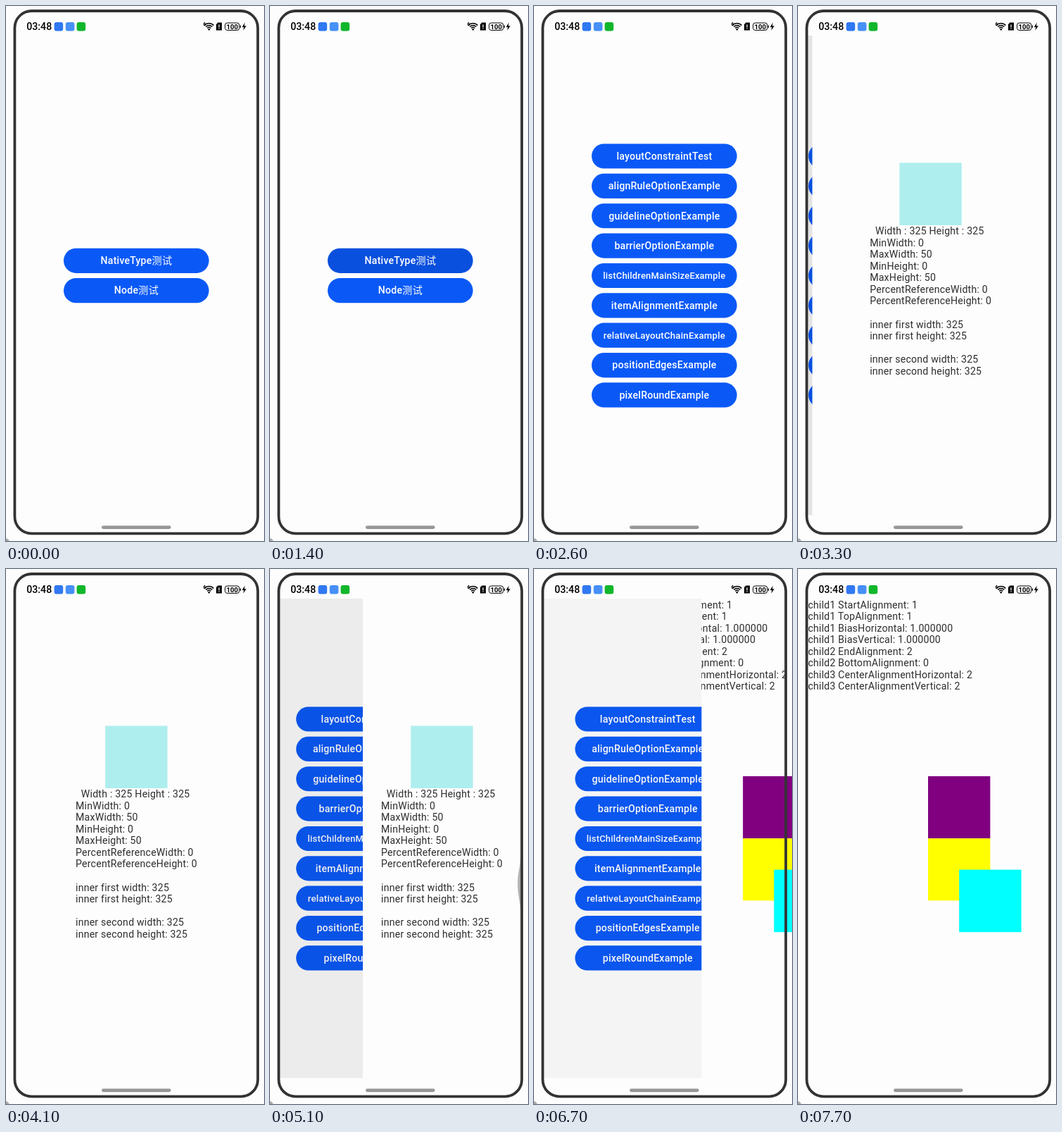
Animation, 367 px wide and 759 px high, one loop 8000 ms. Source, as an HTML page:

```html
<!DOCTYPE html>
<html lang="en">
<head>
<meta charset="utf-8">
<title>Phone navigation</title>
<style>
html, body { margin: 0; width: 100%; height: 100%; overflow: hidden; background: #fdfdfd; }
svg { display: block; width: 100%; height: 100%; }
text { font-family: Roboto, "Noto Sans CJK SC", "Noto Sans CJK", sans-serif; font-size: 14.15px; letter-spacing: .2px; white-space: pre; }
.label { fill: #fff; font-weight: 500; text-anchor: middle; }
.body { fill: #2e2e2e; }
</style>
</head>
<body>
<svg id="stage" viewBox="0 0 367 759"></svg>
<script>
const LOOP = 8000, STEP = 100, SLIDE = 600;
const LEFT = 14, TOP = 42, WIDTH = 342.4, HEIGHT = 680.5;
const BLUE = '#0a59f7', PRESSED = '#0950de', PAPER = '#fdfdfd';

const rect = (x, y, w, h, fill, rx = 0) =>
  `<rect x="${x}" y="${y}" width="${w}" height="${h}" rx="${rx}" fill="${fill}"/>`;

const buttons = (labels, top, sizes = {}) => labels.map((label, i) => {
  const y = top + i * 42.37;
  return rect(82, y, 206.7, 35.2, BLUE, 17.6) +
    `<text class="label" x="185.4" y="${y + 22.4}" style="font-size:${sizes[i] || 14.15}px">${label}</text>`;
}).join('');

const lines = (rows, x, y) => rows.map((row, i) =>
  `<text class="body" x="${x}" y="${y + i * 16.57}">${row}</text>`).join('');

const home = buttons(['NativeType测试', 'Node测试'], 343.7);

const list = buttons([
  'layoutConstraintTest', 'alignRuleOptionExample', 'guidelineOptionExample',
  'barrierOptionExample', 'listChildrenMainSizeExample', 'itemAlignmentExample',
  'relativeLayoutChainExample', 'positionEdgesExample', 'pixelRoundExample'
], 195.4, { 4: 12.95, 6: 13.26 });

const layout = rect(141.2, 222.5, 88.4, 88.5, '#afeeee') +
  lines(['Width : 325 Height : 325'], 106.8, 324) +
  lines([
    'MinWidth: 0', 'MaxWidth: 50', 'MinHeight: 0', 'MaxHeight: 50',
    'PercentReferenceWidth: 0', 'PercentReferenceHeight: 0', '',
    'inner first width: 325', 'inner first height: 325', '',
    'inner second width: 325', 'inner second height: 325'
  ], 99, 340.6);

const align = lines([
  'child1 StartAlignment: 1', 'child1 TopAlignment: 1',
  'child1 BiasHorizontal: 1.000000', 'child1 BiasVertical: 1.000000',
  'child2 EndAlignment: 2', 'child2 BottomAlignment: 0',
  'child3 CenterAlignmentHorizontal: 2', 'child3 CenterAlignmentVertical: 2'
], 14.2, 55.5) +
  rect(185, 294, 88.4, 88.4, '#800080') +
  rect(185, 382.2, 88.4, 88.2, '#ffff00') +
  rect(229.2, 426.6, 88.5, 88.6, '#00ffff');

const page = (content, i) => `
  <clipPath id="clip${i}"><rect x="${LEFT}" y="${TOP}" width="${WIDTH}" height="${HEIGHT}"/></clipPath>
  <g class="page" clip-path="url(#clip${i})">
    ${rect(LEFT, TOP, WIDTH, HEIGHT, PAPER)}
    <g class="content">${content}</g>
    <rect class="dim" x="${LEFT}" y="${TOP}" width="${WIDTH}" height="${HEIGHT}"/>
  </g>`;

const arc = r => {
  const d = r * .72;
  return `<path d="M${288.8 - d} ${34 - d}A${r} ${r} 0 0 1 ${288.8 + d} ${34 - d}" fill="none" stroke="#000" stroke-width="1.5"/>`;
};

const statusBar = `
  <text x="29.3" y="34" style="font-weight:500;letter-spacing:0">03:48</text>
  ${rect(68.6, 23, 12.6, 12.4, '#2f78f2', 3)}
  ${rect(84.8, 23, 12.6, 12.4, '#4690f8', 3)}
  ${rect(100.6, 23, 12.6, 12.4, '#10b62c', 3)}
  ${arc(3.6)}${arc(6.4)}${arc(9.2)}<circle cx="288.8" cy="33.2" r="1.3"/>
  <text x="280.6" y="28.4" style="font-size:6.5px;font-weight:700">6</text>
  <path d="M301.5 23.5H307V34.5H299V26Z"/>
  ${rect(302.4, 26.3, 1.3, 4, '#fff')}${rect(302.4, 31.3, 1.3, 1.3, '#fff')}
  <rect x="311.6" y="24" width="20.2" height="10.4" rx="3" fill="none" stroke="#000"/>
  ${rect(332.8, 27.2, 1.2, 4, '#000', .6)}
  <text x="321.8" y="32.7" text-anchor="middle" style="font-size:9.6px;font-weight:700;letter-spacing:.1px">100</text>
  <path d="M339.8 23.6L335.8 30H338.4L337.4 34.8L341.8 28.2H339Z"/>`;

const stage = document.getElementById('stage');
stage.innerHTML = rect(0, 0, 367, 759, PAPER) +
  [home, list, layout, align].map(page).join('') + statusBar + `
  <path id="bulge" fill="#666" opacity=".5"/>
  <path id="chevron" fill="none" stroke="#fff" stroke-width="1.6"/>
  ${rect(136, 737.3, 98.6, 4.6, '#979797', 2.3)}
  <rect x="12.4" y="7" width="345.8" height="741.4" rx="24" fill="none" stroke="#333" stroke-width="3.8"/>
  <path d="M0 755Q4 756 4.5 759H0Z" fill="#aaa"/>`;

const pages = [...stage.querySelectorAll('.page')].map((node, i) => ({
  node,
  mask: stage.querySelector(`#clip${i} rect`),
  content: node.querySelector('.content'),
  dim: node.querySelector('.dim'),
  keys: node.querySelectorAll('.content rect')
}));
const bulge = document.getElementById('bulge');
const chevron = document.getElementById('chevron');

const moves = [
  { at: 1461, under: 0, top: 1 },
  { at: 2980, under: 1, top: 2 },
  { at: 5034, under: 1, top: 2, back: true },
  { at: 6634, under: 1, top: 3 }
];
const presses = [
  { from: 1400, to: 1500, page: 0, row: 0 },
  { from: 2900, to: 3000, page: 1, row: 0 },
  { from: 6500, to: 6700, page: 1, row: 1 }
];
const swipe = [8, 18, 14, 4];

// Critically damped spring with stiffness 342
function spring(ms) {
  if (ms <= 0) return 0;
  if (ms >= SLIDE) return 1;
  const x = Math.sqrt(342) * ms / 1000;
  return 1 - (1 + x) * Math.exp(-x);
}

function place(p, clip, shift, shade) {
  p.mask.setAttribute('x', LEFT + clip);
  p.content.setAttribute('transform', `translate(${shift} 0)`);
  p.dim.setAttribute('opacity', shade);
}

function render(t) {
  const move = moves.filter(m => m.at <= t).pop() || moves[0];
  const s = spring(t - move.at);
  const cover = move.back ? 1 - s : s;

  pages.forEach((p, i) => {
    const shown = (i === move.under && cover < 1) || (i === move.top && cover > 0);
    p.node.style.display = shown ? '' : 'none';
  });
  const gap = WIDTH * (1 - cover);
  place(pages[move.under], 0, -.2 * WIDTH * cover, .1 * cover);
  place(pages[move.top], gap, gap / 2, 0);

  for (const { from, to, page, row } of presses) {
    pages[page].keys[row].setAttribute('fill', t >= from && t < to ? PRESSED : BLUE);
  }

  const depth = swipe[Math.floor((t - 4800) / STEP)] || 0;
  const x = 356.4 - depth;
  bulge.setAttribute('d', depth ? `M356.4 402C356.4 425 ${x} 428 ${x} 447S356.4 469 356.4 492Z` : '');
  chevron.setAttribute('d', depth > 10 ? `M${x + 8} 443L${x + 4} 447L${x + 8} 451` : '');
}

const start = performance.now();
function tick() {
  const t = (performance.now() - start) % LOOP;
  render(Math.floor(t / STEP) * STEP);
  requestAnimationFrame(tick);
}
tick();
</script>
</body>
</html>
```
